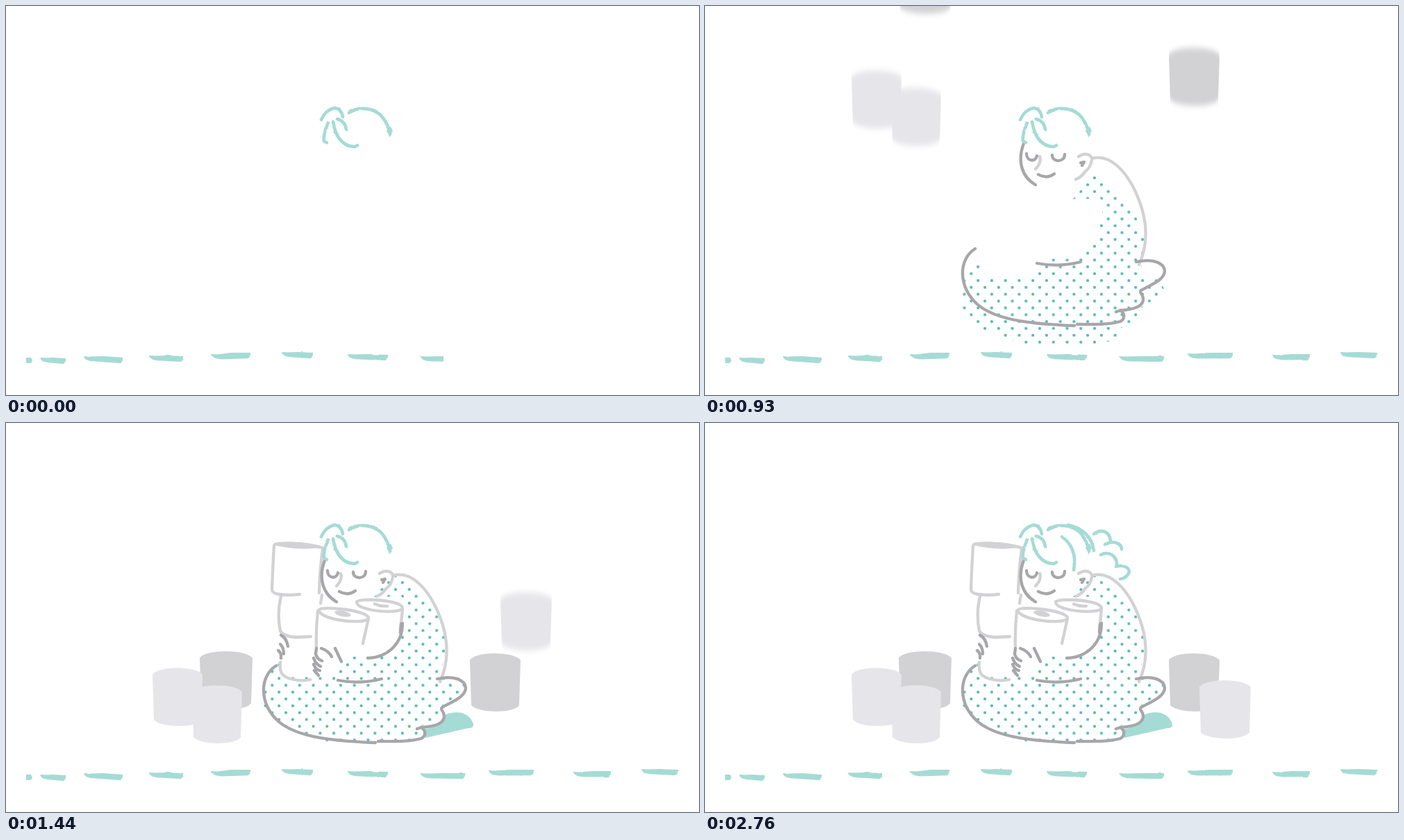
Recreate the animation shown at these times as an HTML page. Size 998 by 561 pixels, loop 2.82 s.

```html
<!DOCTYPE html>
<html lang="en">
<head>
<meta charset="utf-8">
<title>Paper hug</title>
<style>
  html, body { margin: 0; width: 100%; height: 100%; overflow: hidden; background: #fff; }
  svg { display: block; width: 100%; height: 100%; }
  path { fill: none; stroke-width: 4.3; stroke-linecap: round; stroke-linejoin: round; }
  .teal { stroke: #a5dbd5; stroke-width: 4.6; }
  .dark { stroke: #a7a6a9; }
  .pale { stroke: #d2d2d4; }
  .fill { fill: #a5dbd5; stroke: none; }
  .grey { fill: #d2d2d4; stroke: none; }
  .lilac { fill: #e6e5ea; stroke: none; }
</style>
</head>
<body>
<svg viewBox="0 0 998 561">
  <defs>
    <filter id="rough" filterUnits="userSpaceOnUse" x="0" y="0" width="998" height="561" color-interpolation-filters="sRGB">
      <feTurbulence type="fractalNoise" baseFrequency=".13" seed="4"/>
      <feDisplacementMap in="SourceGraphic" scale="2.4" xChannelSelector="R" yChannelSelector="G"/>
    </filter>
    <filter id="blur" x="-10%" y="-30%" width="120%" height="160%">
      <feGaussianBlur stdDeviation="0 4"/>
    </filter>
    <pattern id="dots" patternUnits="userSpaceOnUse" x="457.37" y="452.37" width="19.74" height="19.74">
      <g fill="#55b9ae"><circle cx="4.93" cy="4.93" r="2.1"/><circle cx="14.8" cy="14.8" r="2.1"/></g>
    </pattern>
    <clipPath id="wipe"><rect id="wipeBox" width="630" height="561"/></clipPath>
  </defs>

  <g clip-path="url(#wipe)"><path id="ground" class="fill" filter="url(#rough)"/></g>
  <g id="rolls"></g>

  <g id="shadow"><path class="fill" d="M632 421C650 413 668 418 673 434Q674 440 666 440L604 454 603 442Q630 436 632 421z"/></g>
  <g id="dress"><path style="fill:url(#dots)" d="M556 217L578 221 612 258 632 300 632 335 624 366 655 367 663 385 628 408 631 425 598 437 601 453 560 460 455 460 400 439 371 408 371 375 385 346 396 346 398 365 474 365 478 347 498 337 540 337 550 326 557 310 567 296 574 262 570 250 530 251 540 239z"/></g>

  <g id="stack">
    <path class="grey" d="M386 176C398 168 440 172 459 179Q420 185 386 176z"/>
    <path class="pale" d="M387 175C405 171 440 176 456 180M386 177Q384 210 383 240Q384 246 393 247Q408 249 423 247M456 182Q452 210 451 245M455 248L453 260M396 250Q390 275 395 300Q400 308 418 309L439 308M395 345C393 362 400 366 410 369Q425 373 438 370"/>
    <path class="dark" d="M396 306Q404 310 406 322M395 319Q400 324 400 333M392 328Q397 332 396 339"/>
  </g>

  <g id="body">
    <path class="dark" d="M459 198C449 225 457 247 476 258M389 350C364 366 365 405 392 430C420 455 480 459 532 461"/>
    <path class="pale" d="M482 217Q485 226 476 235M538 217C548 210 558 215 557 222Q555 234 548 238Q542 247 534 250M557 220C585 212 608 242 620 268C637 305 640 340 625 373"/>
  </g>
  <g id="face">
    <path class="dark" d="M463 213C463 224 476 226 478 216M500 215C500 226 518 226 518 214M480 243Q492 250 503 242M541 226L546 225 543 230"/>
  </g>
  <g id="legs">
    <path class="dark" d="M621 369C645 364 661 370 662 382C662 394 645 401 628 410C624 414 632 415 631 424C630 434 615 438 598 439L592 441M598 439C606 444 604 452 598 455C580 460 560 459 536 459M478 371Q510 377 541 369"/>
  </g>

  <g id="hug">
    <path class="pale" d="M505 258C510 252 570 255 571 267C568 276 505 272 505 258zM531 261Q540 265 549 264M571 268L568 300M450 270C455 263 520 270 522 281C522 291 455 286 450 270zM449 271Q446 300 447 325M522 282L514 318"/>
    <ellipse fill="#d2d2d4" cx="485" cy="275" rx="12" ry="4" transform="rotate(12 485 275)"/>
    <path class="dark" d="M571 289C571 318 550 338 521 339M569 290L568 302M447 325L446 333Q448 341 455 343M443 339Q446 348 453 351M443 348Q446 356 452 357M444 357L450 364M454 325Q464 328 469 337M474 325L483 344"/>
  </g>

  <g filter="url(#rough)">
    <path class="teal" d="M454 164Q460 150 473 147Q483 148 485 160M494 154C510 143 532 148 542 160Q551 172 553 185M477 163Q489 166 490 179M471 167C474 185 482 202 502 203L506 201M464 168C459 180 457 190 458 195L462 197"/>
    <path class="fill" d="M549 176L552 190 557 180 554 174z"/>
    <g id="curls"><path class="teal" d="M523 147C545 152 557 165 560 184M514 164C528 174 535 190 531 212M560 160C570 152 583 156 584 170M576 175C590 168 600 175 600 182M570 190C582 184 594 192 593 205M592 207C602 204 611 208 611 215Q607 224 598 225"/></g>
  </g>

  <g id="bigHeart">
    <path class="fill" d="M382 129L376 120C350 118 327 92 329 71C334 63 352 74 358 81C353 55 372 48 374 74C374 95 376 105 378 114L383 126z"/>
    <path stroke="#fff" style="stroke-width:.8" d="M358 81Q362 87 365 96"/>
  </g>
  <g id="smallHeart"><path class="fill" d="M424 126L421 118C410 110 404 95 407 81C412 80 415 84 418 91C418 86 422 82 425 82C428 95 427 105 425 116L427 125z"/></g>
</svg>
<script>
const LOOP = 2820, STEP = 30;
const $ = id => document.getElementById(id);
const clamp = v => Math.min(1, Math.max(0, v));
const easeLeft = (t, start, end) => (1 - clamp((t - start) / (end - start))) ** 2;

// Dashes: left x, left top, right x, right top
const dashes = [
  [49, 507, 86, 508], [112, 505, 168, 507], [206, 504, 255, 505], [296, 502, 352, 500],
  [397, 499, 442, 500], [492, 502, 550, 503], [597, 505, 661, 505], [695, 501, 760, 500],
  [817, 503, 871, 502], [915, 499, 968, 500]
];
$('ground').setAttribute('d', 'M29 507L36 507 38 511 36 515 29 515z' + dashes.map(([x, y, r, s]) =>
  `M${x} ${y}Q${x + 1} ${y + 7} ${x + 16} ${y + 7.5}L${r - 3} ${s + 8.3}Q${r + 1} ${s + 5} ${r} ${s}L${(x + r) / 2} ${Math.min(y, s)}L${x + 9} ${y + .5}z`).join(''));

// Falling rolls: x, top, width, colour class, landing time
const rolls = [
  [279, 329, 76, 'grey', 1401], [211, 353, 72, 'lilac', 1235], [268, 378, 72, 'lilac', 1235],
  [668, 332, 73, 'grey', 1249], [712, 371, 74, 'lilac', 1589]
].map(([x, y, w, cls, land]) => {
  const el = document.createElementNS('http://www.w3.org/2000/svg', 'path');
  el.setAttribute('class', cls);
  el.setAttribute('d', `M0 10C8 -3 ${w - 10} -3 ${w} 10Q${w - 1} 42 ${w - 2} 75C${w - 9} 87 13 87 2 75Q1 42 0 10z`);
  $('rolls').append(el);
  return { el, x, y, land };
});

function place(id, x, y, opacity) {
  $(id).setAttribute('transform', `translate(${x} ${y})`);
  $(id).setAttribute('opacity', opacity);
}

const fades = { face: 300, legs: 390, shadow: 990, hug: 960, stack: 1290, curls: 1440 };

function draw(t) {
  $('wipeBox').setAttribute('width', 630 + 340 * clamp(t / 300));
  for (const id in fades) place(id, 0, 0, clamp((t - fades[id]) / 120));
  place('body', -17 * easeLeft(t, 520, 930), 0, clamp((t - 450) / 120));
  place('dress', 0, 45 * easeLeft(t, 800, 1397), clamp((t - 780) / 90));

  for (const { el, x, y, land } of rolls) {
    const left = Math.max(0, land - t);
    el.setAttribute('transform', `translate(${x} ${y - left * .853})`);
    el.setAttribute('filter', left ? 'url(#blur)' : 'none');
  }

  // Hearts rise and vanish twice
  const age = t < 1650 ? -1 : (t - 1650) % 600;
  const rest = easeLeft(age, 0, 480);
  const shown = age < 0 ? 0 : clamp((480 - age) / 120);
  place('bigHeart', 30 * (rest - .39), 25 * (rest - .39), shown);
  place('smallHeart', 2 * (rest - .39), 48 * (rest - .39), shown);
}

const start = performance.now();
function tick() {
  const t = (performance.now() - start) % LOOP;
  draw(Math.floor(t / STEP) * STEP);
  requestAnimationFrame(tick);
}
tick();
</script>
</body>
</html>
```
